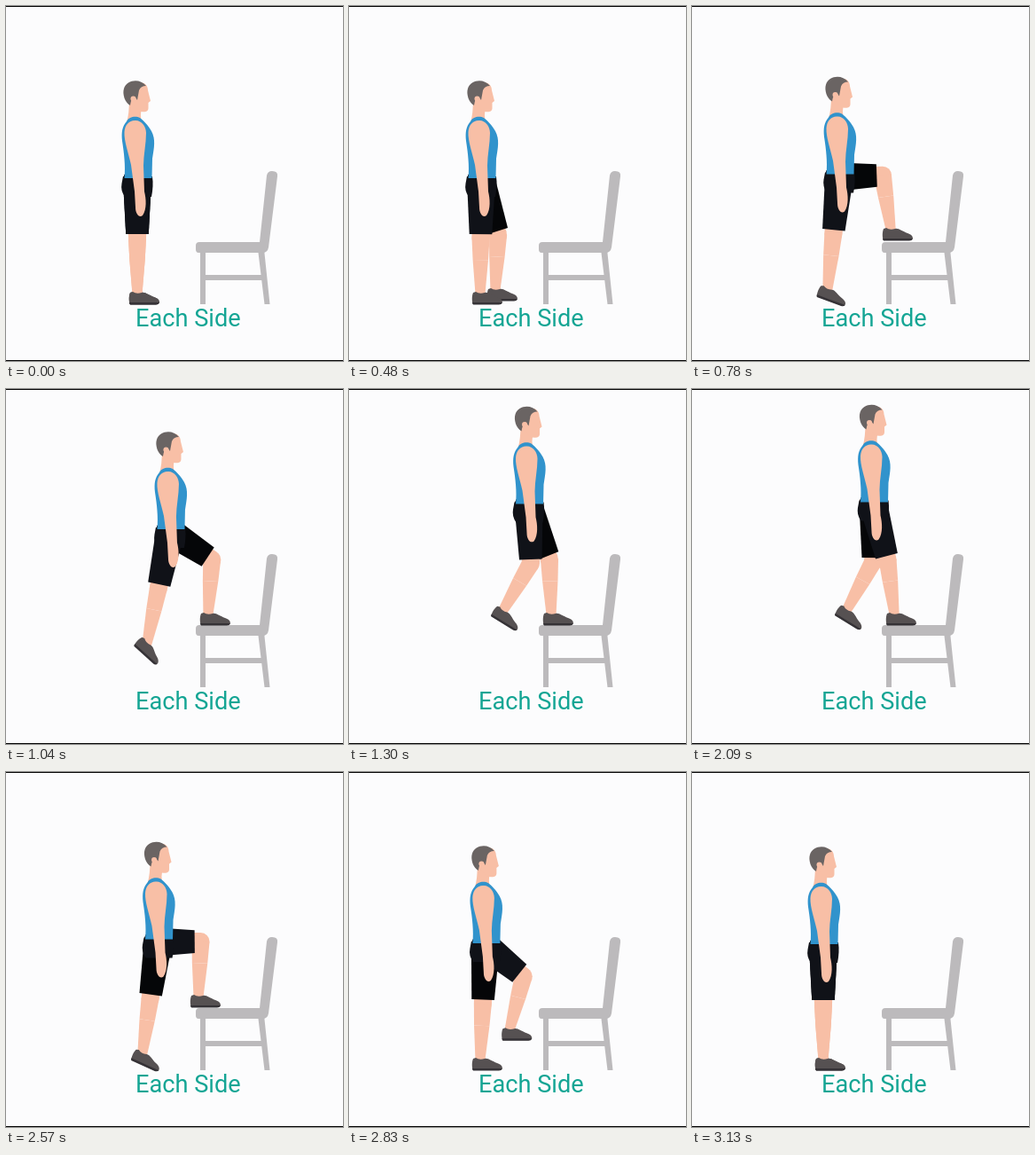
Write an HTML page with a canvas that moves like this. It is 380 px wide and 400 px high and loops after 3270 ms.

```html
<!DOCTYPE html>
<html lang="en">
<head>
<meta charset="utf-8">
<title>Chair step-up</title>
<style>
  html, body { margin: 0; width: 100%; height: 100%; overflow: hidden; background: #fcfcfd; }
  canvas { position: absolute; left: 0; top: 0; width: 380px; height: 400px; }
  p {
    position: absolute; left: 146px; top: 336px; margin: 0;
    font: 400 27.2px/32px Roboto, sans-serif; color: #14a594; white-space: nowrap;
  }
</style>
</head>
<body>
<canvas id="stage"></canvas>
<p>Each Side</p>
<script>
const LOOP = 3270, STEP = 1040 / 24, MOVE = 1040, UP = 480, DOWN = 1960;
const SKIN = '#f8bfa6', HAIR = '#6a6463', TANK = '#3193cc', CHAIR = '#bcbabc';
const SHOE = '#565152', SOLE = '#353236', NEAR = '#101218', FAR = '#050608';
const HIP = [148, 197], ANKLE = [148, 323], SHIN = 61;

const canvas = document.getElementById('stage');
const ctx = canvas.getContext('2d');
const dpr = window.devicePixelRatio || 1;
canvas.width = 380 * dpr;
canvas.height = 400 * dpr;

// Rows: time, x, y, foot angle; offsets from the standing pose.
const up = {
  body: [[440, 0, 0], [480, 1, 0], [783, 18, -4.5], [960, 31, -24], [1130, 43, -48],
         [1303, 54.5, -64.5], [1520, 80, -70]],
  lead: [[440, 0, 0, 0], [480, 17, -4, 0], [620, 42, -46, 0], [783, 76, -72, 0], [830, 80, -70, 0]],
  trail: [[640, 0, 0, 0], [783, 5, -5, .35], [960, 10, -22, .7], [1130, 13, -55, .75],
          [1303, 26, -74, .55], [1420, 56, -80, .2], [1520, 80, -70, 0]]
};
const down = {
  body: [[1920, 80, -70], [2090, 56.5, -66.5], [2280, 43, -47], [2430, 32, -20],
         [2567, 23.5, -5.5], [3000, 0, 0]],
  lead: [[2500, 80, -70, 0], [2567, 69, -71, 0], [2760, 42, -48, 0], [2957, 14, -4, 0], [3000, 0, 0, 0]],
  trail: [[1920, 80, -70, 0], [2010, 56, -80, .2], [2090, 27, -75, .55], [2280, 13, -53, .75],
          [2430, 10, -22, .7], [2567, 6, -7, .42], [2720, 0, 0, 0]]
};

const clamp = (v, lo, hi) => Math.min(hi, Math.max(lo, v));

// Monotone cubic interpolation of every column.
function sample(keys, t) {
  const n = keys.length - 1;
  if (t <= keys[0][0]) return keys[0].slice(1);
  if (t >= keys[n][0]) return keys[n].slice(1);
  let i = 0;
  while (t > keys[i + 1][0]) i++;
  const slope = (j, c) => (keys[j + 1][c] - keys[j][c]) / (keys[j + 1][0] - keys[j][0]);
  const tangent = (j, c) => {
    if (j === 0 || j === n) return 0;
    const a = slope(j - 1, c), b = slope(j, c);
    return a * b <= 0 ? 0 : 2 * a * b / (a + b);
  };
  const [k, m] = [keys[i], keys[i + 1]], h = m[0] - k[0], u = (t - k[0]) / h;
  return k.slice(1).map((v, j) => {
    const c = j + 1, w = 1 - u;
    return v * (1 + 2 * u) * w * w + m[c] * u * u * (3 - 2 * u)
      + h * (tangent(i, c) * u * w * w - tangent(i + 1, c) * u * u * w);
  });
}

function fill(d, color) {
  ctx.fillStyle = color;
  ctx.fill(new Path2D(d));
}

function disc(x, y, r, color) {
  ctx.fillStyle = color;
  ctx.beginPath();
  ctx.arc(x, y, r, 0, 7);
  ctx.fill();
}

function taper(a, ra, b, rb, color) {
  const d = Math.hypot(b[0] - a[0], b[1] - a[1]) || 1;
  const nx = (a[1] - b[1]) / d, ny = (b[0] - a[0]) / d;
  ctx.fillStyle = color;
  ctx.beginPath();
  ctx.moveTo(a[0] + nx * ra, a[1] + ny * ra);
  ctx.lineTo(b[0] + nx * rb, b[1] + ny * rb);
  ctx.lineTo(b[0] - nx * rb, b[1] - ny * rb);
  ctx.lineTo(a[0] - nx * ra, a[1] - ny * ra);
  ctx.fill();
}

function drawChair() {
  fill('M219 274H225V336H219ZM284 274H291L297.5 336H291.5ZM222 303H289V309H222Z', CHAIR);
  fill('M218 266H286L294 191Q295 186 300 186Q307 186 306 192L296 272Q295 278 289 278H217Q214 278 214 274V270Q214 266 218 266Z', CHAIR);
}

function drawShoe([x, y], angle) {
  ctx.save();
  ctx.translate(x, y);
  ctx.rotate(angle);
  fill('M-8 0C-10 5 -9 10 -8.5 13H21C27 13 26 7 19 5C13 3 9 -1 5 0Q-1 2 -5 -1Z', SHOE);
  fill('M-9 11H25Q24 13.5 21 13.5H-8Z', SOLE);
  ctx.restore();
}

function drawLeg(hip, [dx, dy, angle], shorts) {
  const ankle = [ANKLE[0] + dx, ANKLE[1] + dy];
  const vx = ankle[0] - hip[0], vy = ankle[1] - hip[1], d = Math.hypot(vx, vy);
  const thigh = 48 + 16 * clamp((d - 80) / 40, 0, 1);
  const along = (thigh * thigh - SHIN * SHIN + d * d) / (2 * d);
  const bend = Math.sqrt(Math.max(0, thigh * thigh - along * along));
  const knee = [hip[0] + (vx * along + vy * bend) / d, hip[1] + (vy * along - vx * bend) / d];
  const mix = (a, b, f) => a.map((v, i) => v + (b[i] - v) * f);
  const calf = mix(knee, ankle, .4);

  taper(hip, 11, knee, 10, SKIN);
  disc(knee[0], knee[1], 10, SKIN);
  taper(knee, 10, calf, 8.7, SKIN);
  taper(calf, 8.7, mix(knee, ankle, 1.06), 5.3, SKIN);
  drawShoe(ankle, angle);

  disc(hip[0], hip[1], 16, shorts);
  taper(hip, 16, mix(hip, knee, (thigh * 1.15 - 14) / thigh), 12.8, shorts);
}

function drawUpper() {
  fill('M132 192H165Q166.500 203 164 215H134Q129 208 130.500 200Z', NEAR);
  // neck, face, hair
  fill('M139 104H153V117Q151 122 153 131H136Q139 122 139 104Z', SKIN);
  fill('M146 88C152 84 160 87 160 95L163 107L160.500 109V115C160.500 120 155 120 149 118L141 108Z', SKIN);
  fill('M140 112C134 109 131 99 133 93C136 83 151 81 158 90Q152 90 150 95L148 106L145 102Q141 104 140 112Z', HAIR);
  disc(143.5, 104.5, 3, SKIN);
  // torso and arm
  fill('M136 130C139 124 147 124 151 126C156 130 160 134 164 141C169 150 167 160 165 172L164.500 194H133.500C135 180 133 165 131 152C130 142 131 136 136 130Z', TANK);
  fill('M145 129C152 128 158 135 158 143C158 155 155 168 155 180L156 209C158 217 159 229 154 236C150 239 146 234 146 227L145 209L141 179C138 165 133 152 133.500 142C134 134 139 129 145 129Z', SKIN);
}

function drawFigure(t) {
  const set = t < (UP + DOWN + MOVE) / 2 ? up : down;
  const body = sample(set.body, t), lead = sample(set.lead, t), trail = sample(set.trail, t);
  const hip = [HIP[0] + body[0], HIP[1] + body[1]];
  const [far, near] = set === up ? [lead, trail] : [trail, lead];
  drawLeg(hip, far, FAR);
  drawLeg(hip, near, NEAR);
  ctx.save();
  ctx.translate(body[0], body[1]);
  drawUpper();
  ctx.restore();
}

function stepped(t) {
  if (t < UP) return 0;
  const start = t < DOWN ? UP : DOWN;
  return start + Math.min(MOVE, Math.floor((t - start + 4) / STEP) * STEP);
}

function frame() {
  const t = performance.now() % LOOP;
  ctx.setTransform(dpr, 0, 0, dpr, 0, 0);
  ctx.fillStyle = '#fcfcfd';
  ctx.fillRect(0, 0, 380, 400);
  drawChair();
  drawFigure(stepped(t));
  ctx.fillStyle = '#000';
  ctx.fillRect(0, 0, 380, 1);
  ctx.fillRect(0, 399, 380, 1);
  requestAnimationFrame(frame);
}
frame();
</script>
</body>
</html>
```
